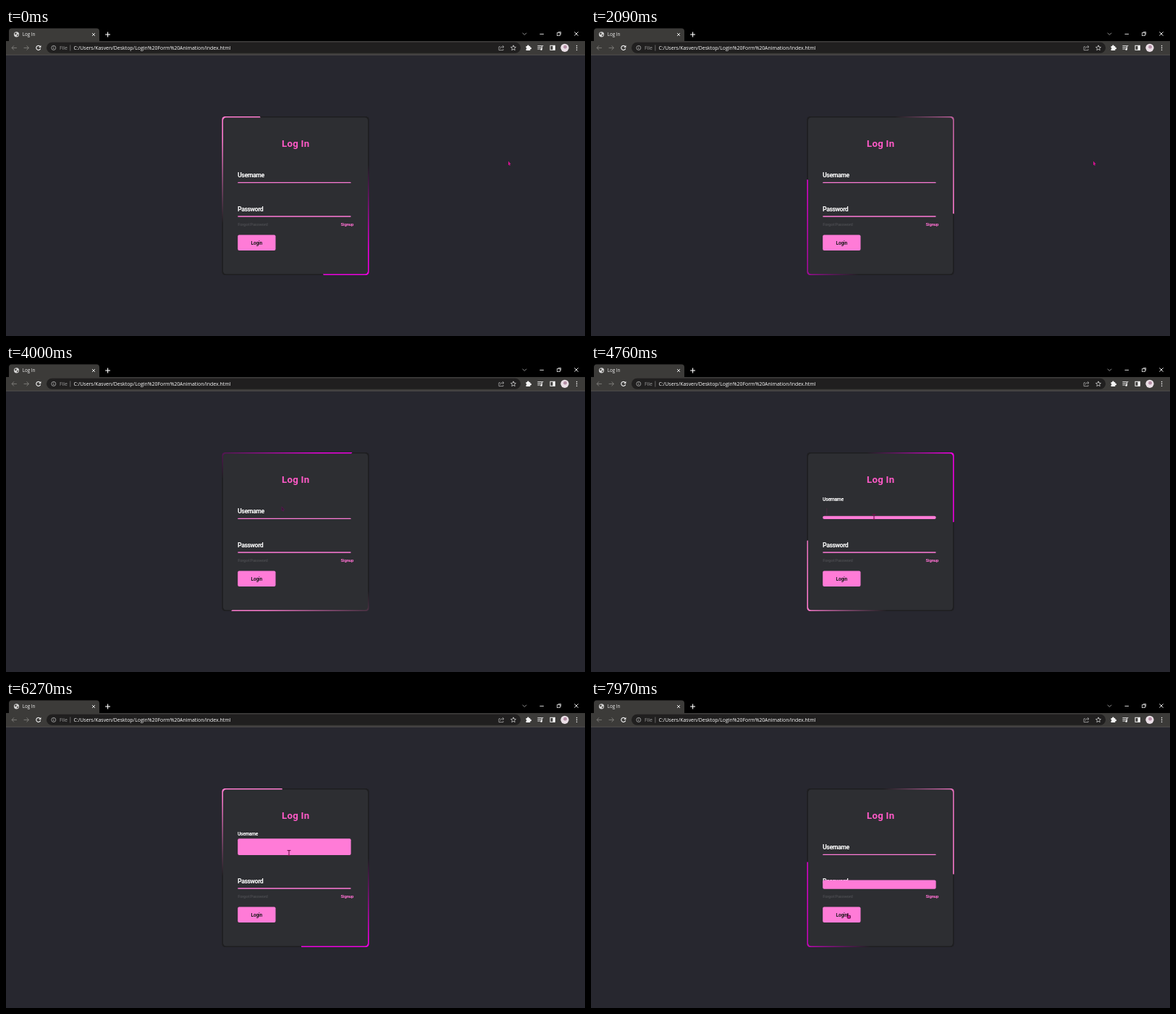
These frames come from a looping animation (800x425 px, 8000 ms). An HTML page with a canvas:

```html
<!DOCTYPE html>
<html lang="en">
<head>
<meta charset="utf-8">
<title>Log In</title>
<style>
html, body { margin: 0; width: 100%; height: 100%; overflow: hidden; background: #27272f; }
canvas { display: block; width: 800px; height: 425px; }
</style>
</head>
<body>
<canvas id="stage"></canvas>
<script>
const canvas = document.getElementById('stage');
const ctx = canvas.getContext('2d');
const ratio = window.devicePixelRatio || 1;
canvas.width = 800 * ratio;
canvas.height = 425 * ratio;

const LOOP = 8000;
const PINK = '#ff7bd7', HOT = '#ff5ac8', CARD = '#2d2e32';
const UI = '"Open Sans", sans-serif';
const FORM = 'Roboto, sans-serif';
const BOX = { x: 298.4, y: 122, w: 203.2, h: 219 };
// The glow turns about a point slightly left of the card's centre.
const PIVOT = { x: 394.8, y: 231.5 };
const FOCUS_USER = 4700, FOCUS_PASS = 6730, BLUR_PASS = 7825;

const clamp = v => Math.max(0, Math.min(1, v));

// CSS "ease": cubic-bezier(.25, .1, .25, 1)
function ease(x) {
  x = clamp(x);
  const bez = (a, b, s) => 3 * a * s * (1 - s) ** 2 + 3 * b * s * s * (1 - s) + s ** 3;
  let lo = 0, hi = 1;
  for (let i = 0; i < 20; i++) {
    const mid = (lo + hi) / 2;
    if (bez(.25, .25, mid) < x) lo = mid; else hi = mid;
  }
  return bez(.1, 1, lo);
}

function rounded(x, y, w, h, r, fill) {
  ctx.beginPath();
  ctx.roundRect(x, y, w, h, r);
  ctx.fillStyle = fill;
  ctx.fill();
}

function line(points, color, width = 1) {
  ctx.beginPath();
  points.forEach(([x, y], i) => i ? ctx.lineTo(x, y) : ctx.moveTo(x, y));
  ctx.strokeStyle = color;
  ctx.lineWidth = width;
  ctx.stroke();
}

function polygon(points, fill) {
  ctx.beginPath();
  points.forEach(([x, y]) => ctx.lineTo(x, y));
  ctx.closePath();
  ctx.fillStyle = fill;
  ctx.fill();
}

function disc(x, y, r, fill) {
  ctx.beginPath();
  ctx.arc(x, y, r, 0, Math.PI * 2);
  ctx.fillStyle = fill;
  ctx.fill();
}

function ring(x, y, r, color, width = .8, from = 0, to = Math.PI * 2) {
  ctx.beginPath();
  ctx.arc(x, y, r, from, to);
  ctx.strokeStyle = color;
  ctx.lineWidth = width;
  ctx.stroke();
}

function text(str, x, y, font, color, spacing = 0) {
  ctx.font = font;
  ctx.letterSpacing = spacing + 'px';
  ctx.fillStyle = color;
  ctx.fillText(str, x, y);
}

const formText = (str, x, y, size, color, spacing) =>
  text(str, x, y, `700 ${size}px ${FORM}`, color, spacing);

function drawTabs() {
  ctx.fillStyle = '#000';
  ctx.fillRect(0, 0, 800, 18);
  rounded(4, 0.5, 125, 20, [4, 4, 0, 0], '#3c3b39');

  disc(14.5, 8.8, 3.6, '#d4d4d4');
  polygon([[12, 7], [14, 6.3], [15, 8], [13.4, 9.3], [12, 8.8]], '#55534f');
  polygon([[15, 9.5], [17.4, 8.6], [16.8, 10.6], [15, 11.6]], '#55534f');
  text('Log In', 22.8, 11.2, `400 6.2px ${UI}`, '#f2f2f2');
  line([[119, 7], [123, 11]], '#f0f0f0', .9);
  line([[123, 7], [119, 11]], '#f0f0f0', .9);
  line([[137.2, 9], [144, 9]], '#fff', 1.1);
  line([[140.6, 5.6], [140.6, 12.4]], '#fff', 1.1);

  line([[713.6, 6.8], [716.4, 9.4], [719.2, 6.8]], '#aaa', .8);
  line([[737.5, 8.4], [743, 8.4]], '#eee', .9);
  ctx.strokeStyle = '#ddd';
  ctx.lineWidth = .8;
  ctx.strokeRect(761.5, 6.6, 4, 4);
  line([[763, 5.4], [766.7, 5.4], [766.7, 9.2]], '#ddd', .8);
  line([[785.4, 5.4], [790.6, 10.6]], '#fff', .9);
  line([[790.6, 5.4], [785.4, 10.6]], '#fff', .9);
}

function drawToolbar() {
  ctx.fillStyle = '#3c3b39';
  ctx.fillRect(0, 18, 800, 19);
  ctx.fillStyle = '#54524f';
  ctx.fillRect(0, 36.6, 800, 1);

  for (const [x, dir] of [[11.5, -1], [28, 1]]) {
    line([[x - 3.4, 27.4], [x + 3.4, 27.4]], '#82807d', .9);
    line([[x + dir * .6, 24.4], [x + dir * 3.4, 27.4], [x + dir * .6, 30.4]], '#82807d', .9);
  }
  ring(44.8, 27.4, 3, '#f0f0f0', 1.1, .3, 5.5);
  polygon([[48.4, 23.8], [48.4, 27], [45.2, 27]], '#f0f0f0');

  rounded(56, 19.8, 655, 15, 7.5, '#201f1f');
  ring(65.8, 27.4, 3, '#b4b4b4', .8);
  line([[65.8, 27], [65.8, 29.2]], '#b4b4b4', .8);
  disc(65.8, 25.7, .5, '#b4b4b4');
  text('File', 74, 29.8, `400 6.95px ${UI}`, '#9b9b9b');
  line([[88.8, 23.5], [88.8, 31.5]], '#777', .8);
  text('C:/Users/Kasven/Desktop/Login%20Form%20Animation/index.html',
    93.5, 29.8, `400 6.95px ${UI}`, '#fff');

  line([[683, 25.8], [681, 25.8], [681, 30.6], [687, 30.6], [687, 29]], '#aaa', .8);
  line([[683, 28.6], [684.4, 26], [687.8, 26]], '#aaa', .8);
  line([[686, 24.2], [688, 26], [686, 27.8]], '#aaa', .8);
  const star = [];
  for (let i = 0; i <= 11; i++) {
    const a = i * Math.PI / 5 - Math.PI / 2, r = i % 2 ? 1.7 : 3.7;
    star.push([701 + r * Math.cos(a), 27.6 + r * Math.sin(a)]);
  }
  line(star, '#ccc', .8);

  rounded(718.4, 25, 6, 6, .8, '#f4f4f4');
  disc(721.4, 24.7, 1.3, '#f4f4f4');
  disc(724.8, 28, 1.3, '#f4f4f4');
  disc(718.4, 28.2, 1, '#3c3b39');
  for (const [y, w] of [[24.6, 6], [26.8, 6], [29, 3.4]]) line([[734.4, y], [734.4 + w, y]], '#f4f4f4', .9);
  line([[742.4, 24.6], [740.6, 24.6], [740.6, 29.4]], '#f4f4f4', .9);
  disc(739.6, 29.4, 1.3, '#f4f4f4');
  ctx.strokeStyle = '#f4f4f4';
  ctx.lineWidth = 1;
  ctx.strokeRect(752, 24.3, 6.4, 6);
  ctx.fillStyle = '#f4f4f4';
  ctx.fillRect(755.4, 24.3, 3, 6);

  disc(772, 27.3, 5.6, '#eadfe6');
  disc(772.6, 26.2, 2.4, '#b58fa6');
  for (const y of [24.6, 27.4, 30.2]) disc(788.6, y, .8, '#f4f4f4');
}

function drawGlow(angle, rgb) {
  ctx.save();
  ctx.translate(PIVOT.x, PIVOT.y);
  ctx.rotate(angle * Math.PI / 180);
  const g = ctx.createLinearGradient(0, 0, 0, -218.8);
  g.addColorStop(0, `rgba(${rgb}, 0)`);
  g.addColorStop(.5, `rgb(${rgb})`);
  g.addColorStop(1, `rgb(${rgb})`);
  ctx.fillStyle = g;
  ctx.fillRect(-197.9, -218.8, 197.9, 218.8);
  ctx.restore();
}

function drawCard(t) {
  const { x, y, w, h } = BOX, rim = 1.6;
  ctx.save();
  ctx.beginPath();
  ctx.roundRect(x, y, w, h, 4.2);
  ctx.fillStyle = '#1e1e20';
  ctx.fill();
  ctx.clip();
  const angle = -21.9 + t * .0598;
  drawGlow(angle, '255, 123, 208');
  drawGlow(angle + 180, '238, 0, 224');
  ctx.restore();
  rounded(x + rim, y + rim, w - 2 * rim, h - 2 * rim, 4.2, CARD);
}

// lift: label position, open: bar height, both 0..1
function drawField(label, bottom, lift, open) {
  const size = 8.8 - 2.1 * lift;
  formText(label, 320, bottom - 7.8 - 19.6 * lift, size, '#fff', -.051 * size);
  const height = 1.4 + 21.5 * open;
  rounded(320.2, bottom - height, 156.4, height, Math.min(2, height / 2), PINK);
}

function drawCaret(t, since, bottom) {
  if ((t - since) % 1000 < 500) line([[325.8, bottom - 15], [325.8, bottom - 5]], '#5a2a4c', .7);
}

function drawForm(t) {
  formText('Log In', 381, 164, 13.2, HOT, .3);

  const step = (start, span) => clamp((t - start) / span);
  const slide = start => ease(step(start, 500));
  const snap = start => ease(step(start, 100));
  drawField('Username', 214.1, snap(FOCUS_USER) - snap(FOCUS_PASS), slide(FOCUS_USER) - slide(FOCUS_PASS));
  drawField('Password', 260.7, snap(FOCUS_PASS) - snap(BLUR_PASS), slide(FOCUS_PASS) - slide(BLUR_PASS));
  if (t >= FOCUS_USER && t < FOCUS_PASS) drawCaret(t, FOCUS_USER, 214.1);
  if (t >= FOCUS_PASS && t < BLUR_PASS) drawCaret(t, FOCUS_PASS, 260.7);

  formText('Forgot Password', 320.2, 273.2, 6, '#48494d', -.28);
  formText('Signup', 462.6, 273.2, 6, '#ff70d2', -.2);
  rounded(320.2, 285.5, 52.3, 21.6, 2, PINK);
  formText('Login', 338.6, 298.8, 6.6, '#1c1a1c', -.2);
}

// time, x, y
const PATH = [
  [0, 695, 187], [2150, 695, 187], [2450, 571, 203], [2740, 416, 220], [2880, 411, 221],
  [3300, 405, 217], [4000, 382, 200], [4500, 391, 211], [6350, 391, 211], [6680, 392, 259],
  [6910, 392, 262], [7250, 392, 262], [7720, 357, 297], [7970, 356, 298], [8000, 356, 298]
];

function pointerAt(t) {
  const i = Math.max(1, PATH.findIndex(p => p[0] > t));
  const [t0, x0, y0] = PATH[i - 1], [t1, x1, y1] = PATH[i];
  const k = (t - t0) / (t1 - t0);
  return [x0 + (x1 - x0) * k, y0 + (y1 - y0) * k];
}

function drawArrow(x, y, fill, edge) {
  const shape = [[-1, -3.2], [2.6, .8], [1, 1], [1.8, 2.8], [.8, 3.1], [.1, 1.4], [-1, 2.3]];
  const points = shape.map(([px, py]) => [x + px, y + py]);
  polygon(points, fill);
  if (edge) line([...points, points[0]], edge, .7);
}

function drawBeam(x, y) {
  const color = '#6d1149';
  line([[x, y - 3.4], [x, y + 3.4]], color, 1.1);
  line([[x - 2.4, y - 3.4], [x + 2.4, y - 3.4]], color, 1.1);
  line([[x - 1.8, y + 3.4], [x + 1.8, y + 3.4]], color, 1);
}

function drawHand(x, y) {
  rounded(x - 2, y - 4, 1.6, 5, .8, '#4a0f38');
  rounded(x - 2.4, y - 1.2, 5.4, 5, 1.8, '#5a0f42');
  rounded(x - 1.4, y - .6, 3.6, 3.4, 1.4, '#d01a9c');
}

function drawPointer(t) {
  const [x, y] = pointerAt(t);
  if (y > 285) drawHand(x, y);
  else if (t > 4150 && t < 7300) drawBeam(x, y);
  else if (x > 502) drawArrow(x, y, '#d0128e');
  else drawArrow(x, y, '#3a1636', '#5e1a54');
}

function draw() {
  const t = performance.now() % LOOP;
  ctx.setTransform(ratio, 0, 0, ratio, 0, 0);
  ctx.fillStyle = '#27272f';
  ctx.fillRect(0, 0, 800, 425);
  drawTabs();
  drawToolbar();
  drawCard(t);
  drawForm(t);
  drawPointer(t);
  requestAnimationFrame(draw);
}
draw();
</script>
</body>
</html>
```
